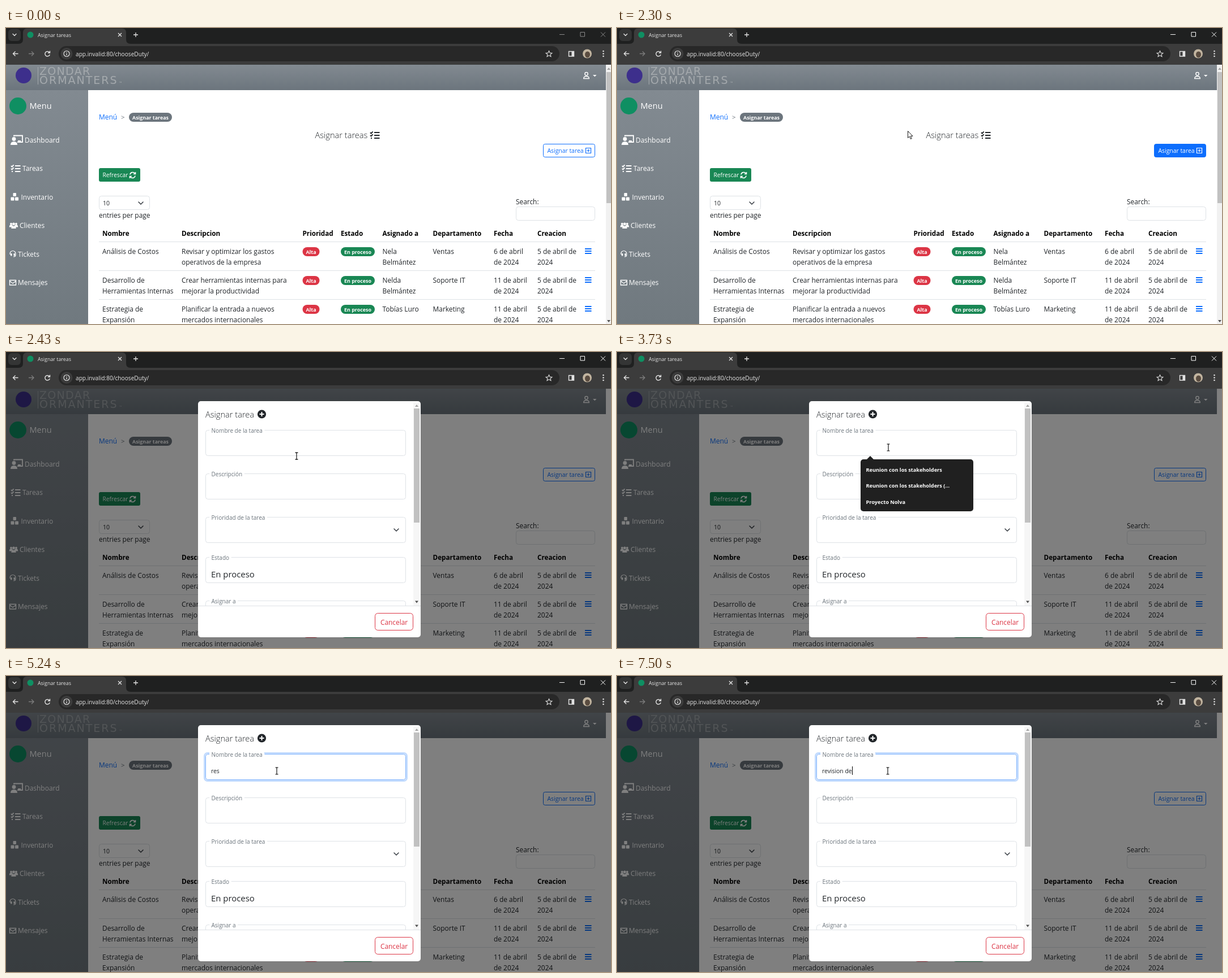
Recreate the animation shown at these times as an HTML page. Size 1068 by 524 pixels, loop 8 s.

```html
<!DOCTYPE html>
<html lang="es">
<head>
<meta charset="utf-8">
<title>Asignar tareas</title>
<style>
html, body { margin: 0; width: 100%; height: 100%; overflow: hidden; background: #fff; }
svg { display: block; width: 1068px; height: 524px; }
text { font-family: "Open Sans", "Noto Sans", sans-serif; white-space: pre; }
.label { fill: #6c757d; stroke: #fff; stroke-width: 9px; paint-order: stroke; }
.logo { font-family: "DejaVu Sans", sans-serif; }
</style>
</head>
<body>
<svg id="stage" viewBox="0 0 1068 524"></svg>
<script>
const INK = '#212529', BLUE = '#0d6efd', GREEN = '#198754', RED = '#dc3545', GREY = '#6c757d', LINE = '#dee2e6';

// Markup helpers
const text = (x, y, s, size = 11.95, fill = INK, extra = '') =>
  `<text x="${x}" y="${y}" font-size="${size}" fill="${fill}" ${extra}>${s}</text>`;
const bold = (x, y, s, size = 11.7, fill = '#000', extra = '') => text(x, y, s, size, fill, 'font-weight="700" ' + extra);
const rect = (x, y, w, h, fill, r = 0, extra = '') =>
  `<rect x="${x}" y="${y}" width="${w}" height="${h}" rx="${r}" fill="${fill}" ${extra}/>`;
const frame = (x, y, w, h, stroke, r = 4, fill = '#fff', extra = '') =>
  rect(x + .5, y + .5, w - 1, h - 1, fill, r, `stroke="${stroke}" ${extra}`);
const disc = (x, y, r, fill, extra = '') => `<circle cx="${x}" cy="${y}" r="${r}" fill="${fill}" ${extra}/>`;
const line = (d, stroke, w = 1, extra = '') => `<path d="${d}" fill="none" stroke="${stroke}" stroke-width="${w}" ${extra}/>`;
const shape = (d, fill, extra = '') => `<path d="${d}" fill="${fill}" ${extra}/>`;
const group = (id, body, extra = '') => `<g id="${id}" ${extra}>${body}</g>`;
const at = (x, y, body) => `<g transform="translate(${x} ${y})">${body}</g>`;
const pill = (x, y, w, s, fill) => rect(x, y, w, 16, fill, 8) + bold(x + w / 2, y + 12, s, 8.9, '#fff', 'text-anchor="middle"');
const chevron = (x, y, r = 4, color = '#343a40', w = 1.5) => line(`M${x - r} ${y - r / 2}l${r} ${r}l${r} ${-r}`, color, w, 'stroke-linecap="round"');
const person = (x, y, s, fill) => disc(x, y, 2.3 * s, fill) +
  shape(`M${x - 4 * s} ${y + 7.5 * s}q0 -4.5 ${4 * s} -4.5t${4 * s} 4.5z`, fill);
const checklist = (x, y, color) => at(x, y,
  line('M0 2l1.6 1.6L4.6 .4M0 6.8l1.6 1.6L4.6 5.2M1 12h2M7 2h9.5M7 7h9.5M7 12h9.5', color, 1.9));

function browser() {
  const icon = '#e3e3e3';
  return rect(0, 0, 1068, 28, '#1f2020') + rect(0, 28, 1068, 37, '#3c3c3c') +
    rect(4, 2, 22, 21, '#343535', 6) + chevron(15, 12, 3, icon, 1.3) +
    shape('M22 28q8 0 8-8V8q0-7 7-7H205q7 0 7 7V20q0 8 8 8z', '#3c3c3c') +
    disc(43, 12, 5.5, '#0f8f62') + text(56, 16, 'Asignar tareas', 8.9, icon) +
    line('M198 9l6 6M204 9l-6 6M225 12h8M229 8v8', icon, 1.3) +
    group('buttons', line('M977 11.5h9M1014 7.5h7.5v7.5h-7.5zM1050 7.5l8 8M1058 7.5l-8 8', 'currentColor')) +
    line('M21.500 45.500h-9M16.500 41.500l-4 4l4 4', icon, 1.4) +
    line('M40 45.500h9M45 41.500l4 4l-4 4', '#7b7b7b', 1.4) +
    line('M76.500 43a4.300 4.300 0 1 0 .8 4M77.500 40.500v3.500h-3.500', icon, 1.4) +
    rect(93, 32, 884, 27, '#282828', 13.5) + disc(107, 45.5, 10.5, '#3c3c3c') +
    disc(107, 45.5, 5, 'none', `stroke="${icon}" stroke-width="1.2"`) + line('M107 45v3.300M107 42.500v1.300', icon, 1.3) +
    text(123, 49.5, 'app.invalid:80/chooseDuty/', 10.15, '#e8e8e8') +
    line('M958.500 40.500l1.600 3.500l3.800.4l-2.900 2.500l.9 3.700l-3.400-2l-3.400 2l.9-3.700l-2.900-2.500l3.800-.4z', icon, 1.1) +
    line('M993.500 41.500h9v8.500h-9z', icon, 1.4) + rect(998.5, 41, 4.5, 9, icon) +
    disc(1026, 45.5, 8, '#c2b5a0') + `<ellipse cx="1026.500" cy="47" rx="4.500" ry="5.500" fill="#5a4c40"/>` +
    [41, 45.5, 50].map(y => disc(1054.5, y, 1.3, icon)).join('');
}

function sidebar() {
  const w = '#fff';
  const items = [['Dashboard', 33], ['Tareas', 29], ['Inventario', 26.5], ['Clientes', 24], ['Tickets', 21], ['Mensajes', 21]];
  return rect(0, 110, 145, 414, 'url(#side)') + disc(21, 138, 15, '#0f8f62') + text(41.5, 143, 'Menu', 14.5, w) +
    items.map(([s, x], i) => text(x, 203 + i * 50.4, s, 11.95, w)).join('') +
    line('M14 192v-1.500h15v11.500h-9', w, 1.8) + disc(14, 196.5, 3.4, w) + shape('M8 207q0-6 6-6t6 6z', w) + rect(21, 199, 5, 3, w) +
    checklist(9, 242, w) +
    rect(12.5, 292, 5.5, 6, w, 1) + rect(8.5, 299.5, 6, 6, w, 1) + rect(16, 299.5, 6, 6, w, 1) +
    person(9, 346.5, .8, w) + person(18, 346.5, .8, w) + person(13.5, 347, 1.05, w) +
    line('M7 401v-1.500a5 5 0 0 1 10 0v2.500q0 3-4 3', w, 1.2) + rect(8, 399, 2.5, 4.5, w, 1) + rect(13.5, 399, 2.5, 4.5, w, 1) +
    line('M6.500 446.500h11v8.500h-11zM6.500 448l5.500 4l5.500-4', w, 1.3);
}

function header() {
  return rect(0, 65, 1059, 45, 'url(#head)') + disc(31, 84, 14, '#3d2f8c') + line('M56.500 69v31', '#a4a9ad') +
    text(59, 83, 'ZONDAR', 19, '#a4a9ad', 'class="logo" letter-spacing="1.3"') +
    text(59, 99, 'ORMANTERS', 19, '#a4a9ad', 'class="logo" letter-spacing="2"') +
    text(200, 99, '™', 6, '#a4a9ad') +
    disc(1024.5, 81.2, 2.7, 'none', 'stroke="#fff" stroke-width="1.400"') +
    line('M1019.700 89.500q0-4 4.800-4t4.800 4z', '#fff', 1.4) + shape('M1036 83h6.500l-3.250 3.300z', '#fff');
}

function table() {
  const cols = [[170, 'Nombre'], [310, 'Descripcion'], [523.5, 'Prioridad'], [591, 'Estado'], [664.5, 'Asignado a'],
    [753.5, 'Departamento'], [861, 'Fecha'], [938, 'Creacion']];
  const cells = [170, 310, 664.5, 753.5, 861, 938];
  const rows = [
    ['Análisis de Costos', 'Revisar y optimizar los gastos|operativos de la empresa', 'Nela|Belmántez', 'Ventas', '6 de abril|de 2024'],
    ['Desarrollo de|Herramientas Internas', 'Crear herramientas internas para|mejorar la productividad', 'Nelda|Belmántez', 'Soporte IT', '11 de abril|de 2024'],
    ['Estrategia de|Expansión', 'Planificar la entrada a nuevos|mercados internacionales', 'Tobías Luro', 'Marketing', '11 de abril|de 2024']];
  return cols.map(([x, s]) => bold(x, 368, s)).join('') + rows.map((row, i) => {
    const y = 400 + i * 51;
    return line(`M164 ${y - 21.5}H1040`, LINE) + pill(523.5, y - 12, 30, 'Alta', RED) + pill(591, y - 12, 60, 'En proceso', GREEN) +
      [...row, '5 de abril de|2024'].map((cell, c) =>
        cell.split('|').map((s, n) => text(cells[c], y + n * 19, s)).join('')).join('') +
      line(`M1022 ${y - 9}h11.500m-11.500 4h11.500m-11.500 4h11.500`, BLUE, 1.8);
  }).join('');
}

function page() {
  return rect(0, 64, 1068, 460, '#fff') + header() + sidebar() +
    text(164, 162, 'Menú', 11.95, BLUE) + text(203, 162, '&gt;', 11.5, GREY) + pill(217, 150, 76, 'Asignar tareas', GREY) +
    text(545.5, 195, 'Asignar tareas', 14.6, INK, 'font-weight="300"') + checklist(643, 183, INK) +
    group('assign', frame(948, 205, 92, 24, BLUE, 3, BLUE, 'id="assignFill"') +
      text(955.5, 221, 'Asignar tarea', 10.4, 'currentColor') +
      line('M1023.500 212.500h9v9h-9zM1028 214.500v5M1025.500 217h5', 'currentColor', 1.2)) +
    rect(164, 248, 73, 24, GREEN, 3) + text(170.5, 264, 'Refrescar', 10.25, '#fff') +
    line('M219 259.500a4.700 4.700 0 0 1 8.500-2M228 261.500a4.700 4.700 0 0 1-8.500 2M228.500 255v3.500h-3.500M218.500 266v-3.500h3.500', '#fff', 1.6) +
    frame(164, 297, 90, 25, LINE) + text(171, 314, '10', 10.5) + chevron(238, 310) +
    text(164, 336, 'entries per page', 11.9) + text(900, 312, 'Search:', 11.9) + frame(900, 316, 140, 25, LINE) +
    table() +
    group('scroll', rect(1059, 65, 9, 459, '#f1f1f1') + rect(1060, 78, 8, 232, '#c1c1c1') +
      shape('M1061 74h6l-3-4z', '#a3a3a3') + shape('M1061 517h6l-3 4z', '#505050'));
}

function modal() {
  const fields = [[138, 'Nombre de la tarea'], [215, 'Descripción'], [292, 'Prioridad de la tarea'], [363, 'Estado'], [440, 'Asignar a']];
  const field = ([y, s]) => frame(352, y, 354, 46, LINE) + text(362.5, y + 5, s, 10, GREY, 'class="label"');
  return rect(339, 87, 393, 418, '#fff', 5) +
    text(352, 116, 'Asignar tarea', 14.6, INK, 'font-weight="300"') +
    disc(451.5, 110, 7.6, INK) + line('M447.500 110h8M451.500 106v8', '#fff', 2) +
    `<g clip-path="url(#body)">` + fields.map(field).join('') + '</g>' +
    group('ring', rect(350.5, 136.5, 357, 49, 'none', 5, 'stroke="#c2dbfe" stroke-width="3"') +
      frame(352, 138, 354, 46, '#86b7fe') + text(362.5, 143, fields[0][1], 10, GREY, 'class="label"')) +
    text(362, 171.5, '', 10.4, INK, 'id="typed"') + rect(0, 160, 1, 15, '#000', 0, 'id="caret"') +
    chevron(689, 315) + text(362, 399, 'En proceso', 14.9) +
    rect(719, 89, 12, 360, '#f6f6f6') + rect(720, 100, 10, 202, '#c1c1c1') +
    shape('M722 97h6l-3-4z', '#a3a3a3') + shape('M722 440.500h6l-3 4z', '#505050') +
    line('M339 449.500H732', LINE) + frame(651, 462, 68, 31, RED, 5) + text(685, 482.5, 'Cancelar', 11.9, RED, 'text-anchor="middle"') +
    group('menu', rect(430, 190, 199, 92, '#202020', 5, 'id="menuBox"') + shape('M440 191l7-7l7 7z', '#202020') +
      bold(439.5, 212, 'Reunion con los stakeholders', 9.2, '#fff') +
      bold(439.5, 240, 'Reunion con los stakeholders (...', 9.2, '#fff') +
      bold(439.5, 268.5, 'Proyecto Nolva', 9.2, '#fff', 'id="third"'));
}

const stage = document.getElementById('stage');
stage.innerHTML = `<defs>
  <linearGradient id="head" x2="0" y2="1"><stop stop-color="#828a91"/><stop offset="1" stop-color="#6c757d"/></linearGradient>
  <linearGradient id="side" x2="0" y2="1"><stop stop-color="#828a91"/><stop offset="1" stop-color="#70797f"/></linearGradient>
  <clipPath id="body"><rect x="339" y="87" width="380" height="362"/></clipPath></defs>` +
  page() + rect(0, 64, 1068, 460, '#000', 0, 'id="shade"') + browser() + group('modal', modal()) +
  group('arrow', shape('M.5.5V12.500L3.300 10L5.300 14.500L7.200 13.700L5.300 9.300H9z', '#fff', 'stroke="#000" stroke-width=".9"')) +
  group('beam', line('M-2.500-6h2l.5.5l.5-.5h2M0-5.500v11M-2.500 6h2l.5-.5l.5.5h2', '#000', 1.1));

const el = id => document.getElementById(id);
const show = (id, amount) => el(id).setAttribute('opacity', +amount);
const ramp = (t, from, to) => Math.min(1, Math.max(0, (t - from) / (to - from)));

// Pointer keys: time, x, y
const arrowPath = [[70, 927, 383], [310, 927, 383], [560, 919, 350], [1070, 955, 273], [1750, 985, 216], [1980, 985, 216], [2300, 513, 182]];
const beamPath = [[2430, 513, 184], [2500, 511, 193], [2700, 511, 193], [3080, 479, 169], [3730, 479, 169], [3840, 478, 168]];
const typing = [[0, ''], [4120, 'r'], [4380, 're'], [4640, 'res'], [5380, 're'], [6150, 'rev'], [6480, 'revi'], [6580, 'revis'],
  [6680, 'revisi'], [6960, 'revisio'], [7160, 'revision'], [7230, 'revision '], [7430, 'revision d'], [7500, 'revision de']];

function place(id, path, t) {
  const n = path.findIndex(key => key[0] > t);
  const b = n < 0 ? path.at(-1) : path[n], a = path[Math.max(0, (n < 0 ? path.length : n) - 1)];
  const k = a === b ? 0 : ramp(t, a[0], b[0]);
  el(id).setAttribute('transform', `translate(${a[1] + (b[1] - a[1]) * k} ${a[2] + (b[2] - a[2]) * k})`);
}

function draw(t) {
  const hover = t < 2370 ? ramp(t, 1560, 1710) : 0;
  el('assignFill').setAttribute('fill-opacity', hover);
  el('assign').style.color = `color-mix(in srgb, #fff ${hover * 100}%, ${BLUE})`;
  el('buttons').style.color = t < 1980 ? '#8a8a8a' : '#fff';
  show('scroll', t < 2370);
  show('shade', t < 2370 ? 0 : .5);
  show('modal', t >= 2430);

  place('arrow', arrowPath, t);
  show('arrow', t >= 70 && t < 2370);
  place('beam', beamPath, t);
  show('beam', t >= 2430);

  show('ring', ramp(t, 3750, 3840));
  show('menu', t < 4720 ? ramp(t, 3600, 3700) : t >= 5460 && t < 6280);
  el('menuBox').setAttribute('height', t < 4200 ? 92 : 64);
  show('third', t < 4200);

  const typed = el('typed');
  typed.textContent = typing.findLast(key => key[0] <= t)[1];
  el('caret').setAttribute('x', Math.round(362 + typed.getComputedTextLength()));
  show('caret', t >= 3840 && (t < 5240 || t >= 5730));
}

const start = performance.now();
function tick() {
  draw((performance.now() - start) % 8000);
  requestAnimationFrame(tick);
}
tick();
</script>
</body>
</html>
```
